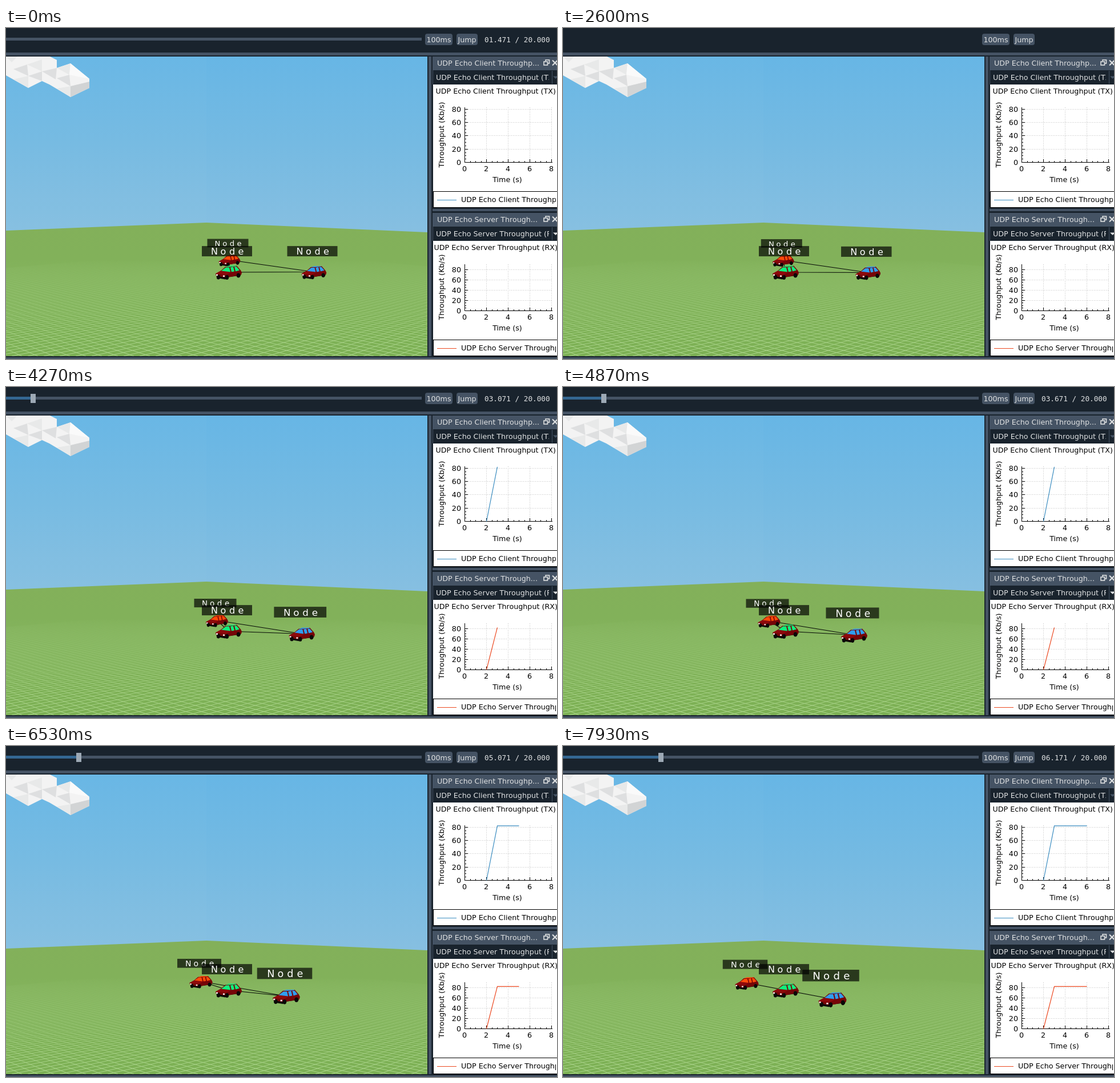
An HTML page with a canvas that plays this animation: 965 by 580 pixels, repeating every 8 s.

```html
<!DOCTYPE html>
<html>
<head>
<meta charset="utf-8">
<style>
html, body { margin: 0; width: 100%; height: 100%; overflow: hidden; background: #19232d }
canvas { display: block }
</style>
</head>
<body>
<canvas id="stage" width="965" height="580"></canvas>
<script>
const context = canvas => canvas.getContext('2d', { willReadFrequently: true });
const stage = context(document.getElementById('stage'));
let c = stage;
const LOOP = 8000;
const DARK = '#19232d', GREY = '#455364', LIGHT = '#dfe1e2';
const UI = '12.7px "DejaVu Sans", sans-serif';
const MONO = '12.7px "DejaVu Sans Mono", monospace';

// [ms, simulation step]: one step is 0.1 simulated seconds
const STEPS = [
  [0, 0], [1870, 1], [2200, 2], [2400, 3], [2600, 4], [2800, 5], [2870, 7], [2930, 8],
  [3200, 9], [3400, 10], [3530, 11], [3670, 12], [3800, 13], [3930, 14], [4070, 15],
  [4270, 16], [4400, 18], [4530, 19], [4730, 20], [4800, 21], [4870, 22], [5000, 24],
  [5200, 25], [5400, 26], [5530, 27], [5670, 28], [5800, 30], [5930, 31], [6130, 32],
  [6270, 33], [6400, 34], [6530, 36], [6670, 37], [6870, 38], [7000, 39], [7070, 40],
  [7200, 41], [7330, 42], [7400, 43], [7600, 44], [7670, 45], [7730, 46], [7930, 47]
];

// Position and label width of each car at the key steps
const KEYS = [0, 4, 10, 22, 36, 47];
const CARS = [
  { glass: '#ff4a0a', ratio: .525, x: [391.5, 385.8, 378, 361, 341.5, 322],
    y: [407.5, 408, 409, 411, 413.5, 416], w: [72, 72, 73, 75, 77, 78.5] },
  { glass: '#10f07c', ratio: .523, x: [390], y: [428.5], w: [88] },
  { glass: '#2f9df0', ratio: .495, x: [539.5, 534.3, 526.5, 510, 491, 472],
    y: [428.5, 429.5, 431.5, 435.5, 439.5, 444.5], w: [88, 88.5, 90.5, 93, 96.5, 99.5] }
];

function rect(color, x, y, w, h) {
  c.fillStyle = color;
  c.fillRect(x, y, w, h);
}

function poly(color, ...p) {
  c.fillStyle = color;
  c.beginPath();
  for (let i = 0; i < p.length; i += 2) c.lineTo(p[i], p[i + 1]);
  c.fill();
}

function line(color, width, ...p) {
  c.strokeStyle = color;
  c.lineWidth = width;
  c.beginPath();
  for (let i = 0; i < p.length; i += 2) c.lineTo(p[i], p[i + 1]);
  c.stroke();
}

function text(s, x, y, color = LIGHT, align = 'left', font = UI) {
  c.fillStyle = color;
  c.font = font;
  c.textAlign = align;
  c.fillText(s, x, y);
}

function clipped(x, y, w, h, draw) {
  c.save();
  c.beginPath();
  c.rect(x, y, w, h);
  c.clip();
  draw();
  c.restore();
}

function vertical(y0, y1, ...colors) {
  const g = c.createLinearGradient(0, y0, 0, y1);
  colors.forEach((k, i) => g.addColorStop(i / (colors.length - 1), k));
  return g;
}

function at(list, n) {
  if (list.length === 1) return list[0];
  let i = 0;
  while (i < KEYS.length - 2 && n > KEYS[i + 1]) i++;
  return list[i] + (list[i + 1] - list[i]) * (n - KEYS[i]) / (KEYS[i + 1] - KEYS[i]);
}

function cloud() {
  poly('#f3f3f3', 0, 50, 77, 50, 89, 56, 89, 70, 113, 62, 146, 89, 146, 105, 113, 121, 76, 99, 63, 93, 39, 105, 0, 83);
  const shade = '#dedfe0', soft = '#e8e9e9';
  poly(shade, 13, 72, 37, 64, 39, 84);
  poly(soft, 39, 84, 39, 105, 13, 90);
  poly(shade, 39, 84, 63, 76, 63, 93);
  poly(soft, 37, 64, 63, 55, 63, 76);
  poly(shade, 63, 76, 89, 70, 87, 90);
  poly(soft, 89, 70, 113, 62, 111, 82);
  poly(shade, 89, 88, 111, 82, 113, 102);
  poly(soft, 113, 102, 113, 121, 89, 106);
  poly('#d2d4d5', 113, 102, 146, 94, 146, 105, 113, 121);
  poly('#fafafa', 113, 62, 146, 89, 111, 82);
  poly(soft, 0, 50, 20, 50, 10, 60);
}

function ground() {
  poly(vertical(341, 575, '#83b05a', '#81b25a', '#7cb054'), 0, 355, 351, 341, 738, 358, 738, 575, 0, 575);
  const ink = vertical(405, 575, 'rgba(172,214,140,0)', 'rgba(172,214,140,.42)', 'rgba(178,218,148,.85)');
  // Parallel lines run towards a vanishing point at height 300
  const ray = (vx, x) => line(ink, 1, vx + (x - vx) * 105 / 275, 405, x, 575);
  for (let i = -4; i < 90; i++) {
    ray(1379, 738 - i * 28);
    ray(-583, i * 28);
  }
}

function car(x, y, scale, glass) {
  c.save();
  c.translate(x, y);
  c.scale(scale, scale);
  const body = '#760508', black = '#0b0808';
  poly(black, -22, 5, -17, 10, -6, 12, 0, 8, 14, 6, 20, 7, 22, 2, -10, 2);
  poly(body, -23, 2, -14, -3, -6, -10, 14, -12, 21, -4, 23, 0, 22, 4, -4, 9, -22, 6);
  poly('#8e090c', -23, 2, -14, -3, 4, 0, -5, 4);
  poly(glass, -13, -3, -5, -9, 1, -9, 3, -1);
  poly(glass, 3, -9, 8, -10, 10, -2, 5, -1);
  poly(glass, 10, -10, 14, -10, 19, -4, 12, -2);
  poly(glass, -5, -10, 0, -12, 13, -12, 14, -11, 2, -10);
  c.fillStyle = black;
  for (const [wx, wy] of [[-18, 8], [-3, 8.5], [17, 5]]) {
    c.beginPath();
    c.ellipse(wx, wy, 3.2, 4, 0, 0, 7);
    c.fill();
  }
  rect('#f4eeee', -22, 3, 3, 2.5);
  rect('#f4eeee', -10, 5, 3, 2.5);
  c.restore();
}

function label(x, y, w) {
  c.save();
  c.translate(x - 3, y - w * .425);
  c.scale(w / 88, w / 88);
  rect('rgba(0,0,0,.68)', -44, -9, 88, 18);
  [...'Node'].forEach((ch, i) =>
    text(ch, -22 + i * 15.5, 6.3, '#fff', 'center', '16px "DejaVu Sans", sans-serif'));
  c.restore();
}

// Sky, cloud and ground never change, so they are painted once
function paintBackdrop() {
  const canvas = document.createElement('canvas');
  canvas.width = 738;
  canvas.height = 575;
  c = context(canvas);
  rect(vertical(50, 355, '#67b6e5', '#75bae2', '#86bfe1'), 0, 50, 738, 308);
  rect('rgba(255,255,255,.012)', 0, 50, 351, 308);
  cloud();
  ground();
  c = stage;
  return canvas;
}

function scene(n) {
  c.drawImage(backdrop, 0, 0);
  const cars = CARS.map(k => ({ ...k, x: at(k.x, n), y: at(k.y, n), w: at(k.w, n) }));
  const [a, b, d] = cars;
  line('#050805', 1.1, a.x, a.y - 1, d.x, d.y - 1, b.x, b.y - .5, a.x, a.y - 1);
  for (const k of cars) car(k.x, k.y, k.w * k.ratio / 46, k.glass);
  for (const k of cars) label(k.x, k.y, k.w);
}

function toolbar(n, blank) {
  for (const [name, x, w] of [['100ms', 734, 48], ['Jump', 789, 37]]) {
    c.fillStyle = GREY;
    c.beginPath();
    c.roundRect(x, 10, w, 20, 4);
    c.fill();
    text(name, x + w / 2, 24.5, LIGHT, 'center');
  }
  if (blank) return;
  const left = 19 + 4 * (n - 10);
  rect(GREY, 0, 17, 728, 5);
  if (left > 0) rect('#346792', 0, 17, left, 5);
  rect('#9da9b5', left, 12, 9, 16);
  const now = (1.471 + n / 10).toFixed(3).padStart(6, '0');
  text(now + ' / 20.000', 838, 25, LIGHT, 'left', MONO);
}

function panel(p, end) {
  const { top, bottom, axisTop, zero, unit, name, dir } = p;
  const full = `UDP Echo ${name} Throughput (${dir})`;
  rect(GREY, 747, top, 218, 24);
  text(p.short, 755, top + 16);
  c.strokeStyle = LIGHT;
  c.lineWidth = 1.6;
  c.strokeRect(945, top + 6, 6.5, 6);
  rect(GREY, 941, top + 8, 8, 8);
  c.strokeRect(942, top + 9, 6.5, 6);
  line(LIGHT, 2, 957, top + 6.5, 966, top + 15.5);
  line(LIGHT, 2, 957, top + 15.5, 966, top + 6.5);

  rect(DARK, 747, top + 24, 218, 25);
  line(GREY, 1, 747.5, top + 24, 747.5, top + 49);
  line(GREY, 1, 956.5, top + 25, 956.5, top + 48);
  clipped(748, top + 24, 203, 25, () => text(full, 753, top + 40.5));
  poly(p.arrow, 958, top + 34.5, 967, top + 34.5, 962.5, top + 39);

  rect('#fff', 748, top + 49, 217, bottom - top - 49);
  text(full, p.titleX, top + 65, '#000');
  const X = s => 803.5 + s * 19, Y = v => zero - v * unit;
  c.setLineDash([1, 2]);
  for (let v = 20; v <= 80; v += 20) line('#bdbdbd', 1, 804, Math.floor(Y(v)) + .5, 957, Math.floor(Y(v)) + .5);
  for (let s = 2; s <= 8; s += 2) line('#bdbdbd', 1, X(s), axisTop, X(s), zero);
  c.setLineDash([]);
  line('#000', 1, 803.5, axisTop, 803.5, zero, 957, zero);
  for (let v = 0; v <= 80; v += 5) {
    const y = Math.floor(Y(v)) + .5;
    line('#000', 1, 803.5, y, v % 20 ? 806 : 809, y);
    if (v % 20 === 0) text(v, 797, y + 4.5, '#000', 'right');
  }
  for (let s = 0; s <= 8; s += .5) {
    const x = Math.floor(X(s)) + .5;
    line('#000', 1, x, zero, x, zero - (s % 2 ? 2.5 : 5.5));
    if (s % 2 === 0) text(s, x - .5, zero + 15, '#000', 'center');
  }
  text('Time (s)', 878, zero + 34, '#000', 'center');
  c.save();
  c.translate(766.5, p.labelY);
  c.rotate(-Math.PI / 2);
  text('Throughput (Kb/s)', 0, 0, '#000', 'center');
  c.restore();
  if (end > 2) line(p.ink, 1.2, X(2), zero, X(3), Y(82), X(end), Y(82));

  c.strokeStyle = '#000';
  c.lineWidth = 1;
  c.strokeRect(748.5, bottom - 28.5, 230, 28);
  line(p.ink, 1, 755, bottom - 13.5, 789, bottom - 13.5);
  clipped(790, bottom - 27, 173, 26, () => text(full, 797, bottom - 10.5, '#000'));
}

const PANELS = [
  { name: 'Client', dir: 'TX', short: 'UDP Echo Client Throughp...', top: 50, bottom: 315, axisTop: 139,
    zero: 235.5, unit: 1.165, titleX: 752.5, labelY: 187, ink: '#3a8cc0', arrow: GREY },
  { name: 'Server', dir: 'RX', short: 'UDP Echo Server Through...', top: 324, bottom: 575, axisTop: 414,
    zero: 495.5, unit: .905, titleX: 749.5, labelY: 454, ink: '#ec4a22', arrow: LIGHT }
];

// Each part is repainted only when what it shows has changed
const shown = {};
function update(part, state, paint) {
  if (shown[part] === state) return;
  shown[part] = state;
  paint();
}

function draw(t) {
  let i = STEPS.length - 1;
  while (STEPS[i][0] > t) i--;
  const n = STEPS[i][1];
  const hover = t >= 1070 && t < 1130, blank = t >= 2600 && t < 2800;
  const end = Math.floor(1.501 + n / 10);
  update('toolbar', `${n} ${blank}`, () => {
    rect(DARK, 0, 0, 965, 43);
    toolbar(n, blank);
  });
  update('splitter', hover, () => rect(hover ? '#60798b' : GREY, 0, 43, 965, 5));
  update('scene', n, () => clipped(0, 50, 738, 525, () => scene(n)));
  update('panels', end, () => PANELS.forEach(p => panel(p, end)));
}

rect(DARK, 0, 0, 965, 580);
rect(GREY, 740, 50, 5, 525);
rect(GREY, 747, 317, 218, 4);
rect(GREY, 0, 577, 965, 3);
const backdrop = paintBackdrop();

const start = performance.now();
function tick() {
  draw((performance.now() - start) % LOOP);
  requestAnimationFrame(tick);
}
tick();
</script>
</body>
</html>
```
